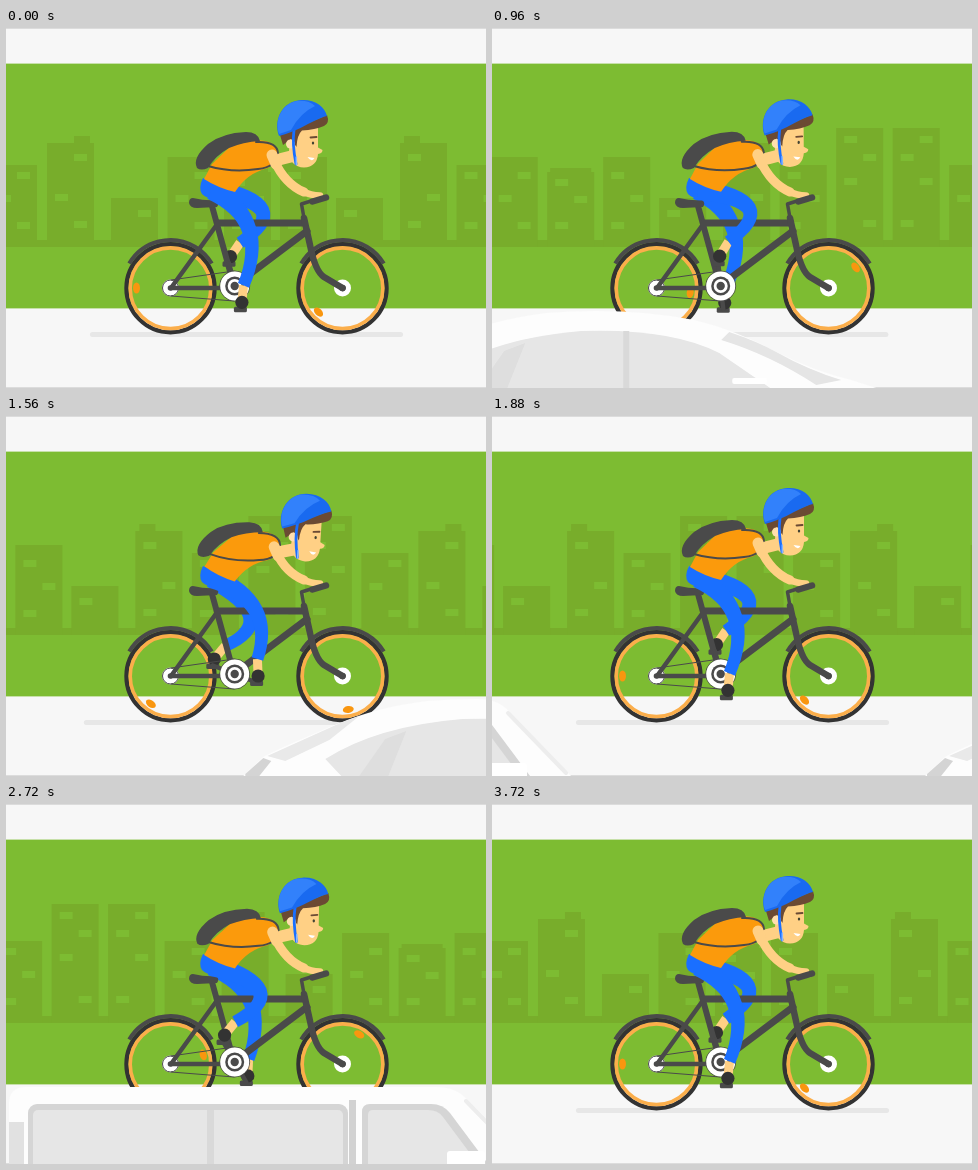
Animation of 480 by 360 pixels, one loop 3.76 s. Source, as an HTML page with a canvas:

```html
<!DOCTYPE html>
<html lang="en">
<head>
<meta charset="utf-8">
<title>City cyclist</title>
<style>
html, body { margin: 0; width: 100%; height: 100%; overflow: hidden; background: #f7f7f7; }
canvas { display: block; }
</style>
</head>
<body>
<canvas id="stage" width="480" height="360"></canvas>
<script>
const ctx = document.getElementById('stage').getContext('2d');
const TAU = Math.PI * 2;
const FRAME = 40, FRAMES = 94, TURN = 47;
const GREEN = '#7dbc32', BUILDING = '#78ad2b', GRAY = '#4a4a4a', DARK = '#333';
const BLUE = '#1a6fff', ORANGE = '#fb9a0c', SKIN = '#ffd085', HAIR = '#6b4a33';
const REAR = 164.5, FRONT = 336.5, HUB = [228.7, 258];

const fill = (d, color) => { ctx.fillStyle = color; ctx.fill(new Path2D(d)); };
const stroke = (d, color, width, cap = 'round') => {
  ctx.strokeStyle = color;
  ctx.lineWidth = width;
  ctx.lineCap = cap;
  ctx.lineJoin = 'round';
  ctx.stroke(new Path2D(d));
};
const rect = (x, y, w, h, color) => { ctx.fillStyle = color; ctx.fillRect(x, y, w, h); };
const pill = (x, y, w, h, r, color) => {
  ctx.fillStyle = color;
  ctx.beginPath();
  ctx.roundRect(x, y, w, h, r);
  ctx.fill();
};
const oval = (x, y, rx, ry, color, turn = 0) => {
  ctx.fillStyle = color;
  ctx.beginPath();
  ctx.ellipse(x, y, rx, ry, turn, 0, TAU);
  ctx.fill();
};
const disc = (x, y, r, color) => oval(x, y, r, r, color);
const ring = (x, y, r, width, color, from = 0, to = TAU) => {
  ctx.strokeStyle = color;
  ctx.lineWidth = width;
  ctx.lineCap = 'butt';
  ctx.beginPath();
  ctx.arc(x, y, r, from, to);
  ctx.stroke();
};
const group = (draw, x, y = 0, angle = 0) => {
  ctx.save();
  ctx.translate(x, y);
  ctx.rotate(angle);
  draw();
  ctx.restore();
};

// Skyline: [offset, top, mirrored]; window rows alternate between two columns.
const CITY_WIDTH = 636;
const CITY = [
  [0, 115, 1], [64, 170, 1], [120.5, 129, 1], [177, 144, 0], [233, 129, 0],
  [289, 170, 0], [353, 115, 0], [409.5, 137, 0], [466, 100, 0], [522.5, 100, 1], [579, 137, 1]
];
const WINDOWS = {
  100: [108, 126, 150, 192], 115: [126, 166, 193], 129: [144, 167, 194],
  137: [144, 167, 194], 144: [151, 168, 194], 170: [182]
};

function building(x, top, mirrored) {
  rect(x, top, 47, 219 - top, BUILDING);
  if (top === 115) rect(x + (mirrored ? 27 : 4), 108, 16, 8, BUILDING);
  if (top === 144) rect(x + 3, 140, 41, 5, BUILDING);
  WINDOWS[top].forEach((y, i) => rect(x + ((i + mirrored) % 2 ? 27 : 8), y, 13, 7, GREEN));
}

function city(frame) {
  rect(0, 35.6, 480, 244.8, GREEN);
  rect(0, 212, 480, 7, BUILDING);
  const shift = frame * 6.785;
  for (const [offset, top, mirrored] of CITY) {
    const x = ((41 + offset - shift + 60) % CITY_WIDTH + CITY_WIDTH * 2) % CITY_WIDTH - 60;
    building(x, top, mirrored);
  }
}

function wheel(x, angle) {
  ring(x, 260.2, 44.1, 4.2, DARK);
  ring(x, 260.2, 40.3, 3.6, '#fbae4b');
  oval(x + 34 * Math.cos(angle), 260 + 34 * Math.sin(angle), 3.5, 5.5, '#f9960f', angle);
  ring(x, 260, 48, 4, GRAY, Math.PI * 1.17, Math.PI * 1.83);
  disc(x, 260, 8.5, '#fff');
}

const pedalAt = angle => [HUB[0] + 23.5 * Math.cos(angle), HUB[1] + 23.5 * Math.sin(angle)];

// Tapered leg bent along a curve; the knee swings at thigh length around the hip.
function leg(angle) {
  const [px, py] = pedalAt(angle);
  const foot = [px + 1.5, py - 6.5];
  const hip = [206, 162];
  const dx = foot[0] - hip[0], dy = foot[1] - hip[1], reach = Math.hypot(dx, dy);
  const thigh = 54, calf = 56;
  const cosBend = (thigh ** 2 + reach ** 2 - calf ** 2) / (2 * thigh * reach);
  const swing = Math.atan2(dy, dx) - Math.acos(Math.min(cosBend, 0.88));
  const knee = [hip[0] + thigh * Math.cos(swing), hip[1] + thigh * Math.sin(swing)];
  const shin = Math.hypot(knee[0] - foot[0], knee[1] - foot[1]);
  const cuff = foot.map((v, i) => v + (knee[i] - v) * 17 / shin);
  const bend = knee.map((v, i) => 2 * v - (hip[i] + cuff[i]) / 2);

  pill(px - 6.5, py - 2, 13, 5.5, 1.5, GRAY);
  stroke(`M${cuff}L${foot}`, SKIN, 9, 'butt');
  const left = [], right = [];
  for (let i = 0; i <= 16; i++) {
    const t = i / 16, u = 1 - t;
    const [x, y] = hip.map((v, k) => u * u * v + 2 * u * t * bend[k] + t * t * cuff[k]);
    const [tx, ty] = hip.map((v, k) => u * (bend[k] - v) + t * (cuff[k] - bend[k]));
    const r = (6 + 1.5 * u + 2.5 * u * u) / Math.hypot(tx, ty);
    left.push([x - ty * r, y + tx * r]);
    right.unshift([x + ty * r, y - tx * r]);
  }
  fill('M' + left.concat(right).join('L') + 'Z', BLUE);
  disc(foot[0], foot[1], 6.6, DARK);
}

function bikeFrame(angle) {
  stroke('M165 252L228 243M165 268L228 273', GRAY, 1);
  stroke('M165 260H228M165 260L212 195', GRAY, 4.5);
  stroke('M206 178L228 258', GRAY, 6);
  stroke('M212 195H298M301 203L232 255', GRAY, 7);
  stroke('M298 190L304 217Q309 243 318 249L336.5 260', GRAY, 6.5);
  stroke('M298 190L295.5 176L305 173', GRAY, 3.5);
  fill('M187 170Q183 170 183 175Q184 180 191 180L211 179Q214 175 210 172Q200 173 187 170Z', GRAY);
  ring(REAR, 260, 8, 1, GRAY);
  disc(REAR, 260, 2.8, GRAY);
  disc(FRONT, 260, 3.3, GRAY);
  stroke(`M${pedalAt(angle)}L${pedalAt(angle + Math.PI)}`, GRAY, 4.5);
  ring(...HUB, 15, 1, GRAY);
  disc(...HUB, 14.5, '#fff');
  disc(...HUB, 9.5, GRAY);
  disc(...HUB, 7, '#fff');
  disc(...HUB, 4.2, GRAY);
}

function head() {
  stroke('M275 131L291 127', SKIN, 12);
  fill('M284 104L312 98L312 119.5L316.5 122Q316.5 125.5 312 126Q311 139 298 139.5Q284 139 283 124Z', SKIN);
  fill('M274 107L321 87Q324 95 318 98Q309 102 296 102.5Q291 107 290.5 119L285 111L277 117Z', HAIR);
  disc(284.5, 116, 4.5, '#ffdfae');
  stroke('M288 102Q286 116 290 136', BLUE, 2.8);
  stroke('M290.3 129V136.5', '#8ab8ff', 1.5);
  fill('M273 108C267 91 277 73 295 72C309 71 319 79 321 88Q316 89 302 96Q288 104 273 108Z', '#196af0');
  fill('M273 106C268 91 277 75 291 73Q303 72 309 78Q294 85 285 102Z', '#3281fb');
  stroke('M304.5 109.5L310.5 109', HAIR, 1.8);
  oval(307, 115, 1.2, 1.6, '#443');
  fill('M301.5 129L308.5 130Q305.5 135 301.5 129Z', '#fff');
}

function torso() {
  fill('M198 151L206 136L228 115L250 112Q268 112 272 123Q273 131 262 140Q241 145 229 164Q212 160 198 151Z', ORANGE);
  fill('M191 140Q186 130 202 116Q216 105 240 104Q252 104 254 113Q237 114 223 120Q209 128 202 140Q195 143 191 140Z', GRAY);
  stroke('M250 114Q271 113 272 125Q271 139 252 141Q226 145 202 138', GRAY, 2);
  head();
}

function arm(tilt) {
  const x = 266 + 34 * tilt, y = 127 + 61 * tilt;
  const elbow = `${279 + 12 * tilt} ${156 + 12 * tilt}`;
  stroke(`M${x} ${y}L${x + 4} ${y + 9}`, SKIN, 11);
  stroke(`M${x + 2} ${y + 5}Q${elbow} 298 164`, SKIN, 9);
  stroke('M297 163.5Q305 167.5 314 167.5', SKIN, 6.5);
  stroke('M306.5 173.5L320 169.5', GRAY, 6.5);
}

function rider(tilt, near) {
  leg(near + Math.PI);
  bikeFrame(near);
  fill('M197 150Q192 160 196 166Q202 172 212 171L231 163Z', BLUE);
  leg(near);
  group(() => group(torso, -205, -160), 205, 160, tilt);
  arm(tilt);
}

function car() {
  fill('M66 360L86 341Q100 333 160 308Q200 291 250 285Q330 279 398 292Q440 302 480 324Q520 344 555 352L580 360Z', '#fdfdfd');
  fill('M90 340L163 307L182 300L152 324L108 345Z', '#e9e9e9');
  fill('M433 304Q460 313 480 324Q512 342 545 352L520 357Q474 327 425 312Z', '#e5e5e5');
  fill('M68 358L86 342L94 345L82 360H68Z', '#d4d4d4');
  fill('M148 343Q200 310 285 303Q375 300 423 325L474 360H164Z', '#e6e6e6');
  fill('M182 360L208 323L229 315L211 360Z', '#dedede');
  rect(327, 303, 6, 57, '#d9d9d9');
  pill(436, 350, 35, 6, 2, '#fff');
}

function van() {
  fill('M3 360V300Q3 283 20 283H430Q452 283 463 298L523 360Z', '#fdfdfd');
  rect(3, 318, 15, 42, '#e1e1e1');
  pill(22, 300, 320, 80, [9, 9, 0, 0], '#d5d5d5');
  pill(27, 306, 310, 80, [5, 5, 0, 0], '#e6e6e6');
  rect(201, 306, 7, 54, '#d9d9d9');
  rect(343, 296, 7, 64, '#d2d2d2');
  fill('M356 360V308Q356 300 364 300H425Q437 300 444 309L482 360Z', '#d5d5d5');
  fill('M362 360V311Q362 306 367 306H422Q432 306 437 313L472 360Z', '#e6e6e6');
  stroke('M460 297L518 357', '#ededed', 4);
  pill(441, 347, 38, 20, 3, '#fff');
}

function draw(frame) {
  // The turn's first and last poses coincide.
  const phase = frame % TURN / (TURN - 1);
  const spin = phase * TAU;
  const bob = 0.73 - Math.cos(TAU * (phase * 2 - 0.12));
  rect(0, 0, 480, 360, '#f7f7f7');
  city(frame);
  rect(0, 0, 480, 1, '#dcdcdc');
  rect(0, 359, 480, 1, '#dcdcdc');
  const half = 156.5 + 3.8 * bob;
  pill(240.5 - half, 304, half * 2, 5, 2.5, '#e7e7e7');
  wheel(REAR, Math.PI + spin);
  wheel(FRONT, Math.PI * 0.75 + spin);
  rider(0.039 * bob, 1.326 + spin);
  group(car, (frame - 32) * 24.47);
  group(van, (frame - 68) * 21.14);
}

const start = performance.now();
function tick() {
  draw(Math.floor((performance.now() - start) / FRAME) % FRAMES);
  requestAnimationFrame(tick);
}
tick();
</script>
</body>
</html>
```
